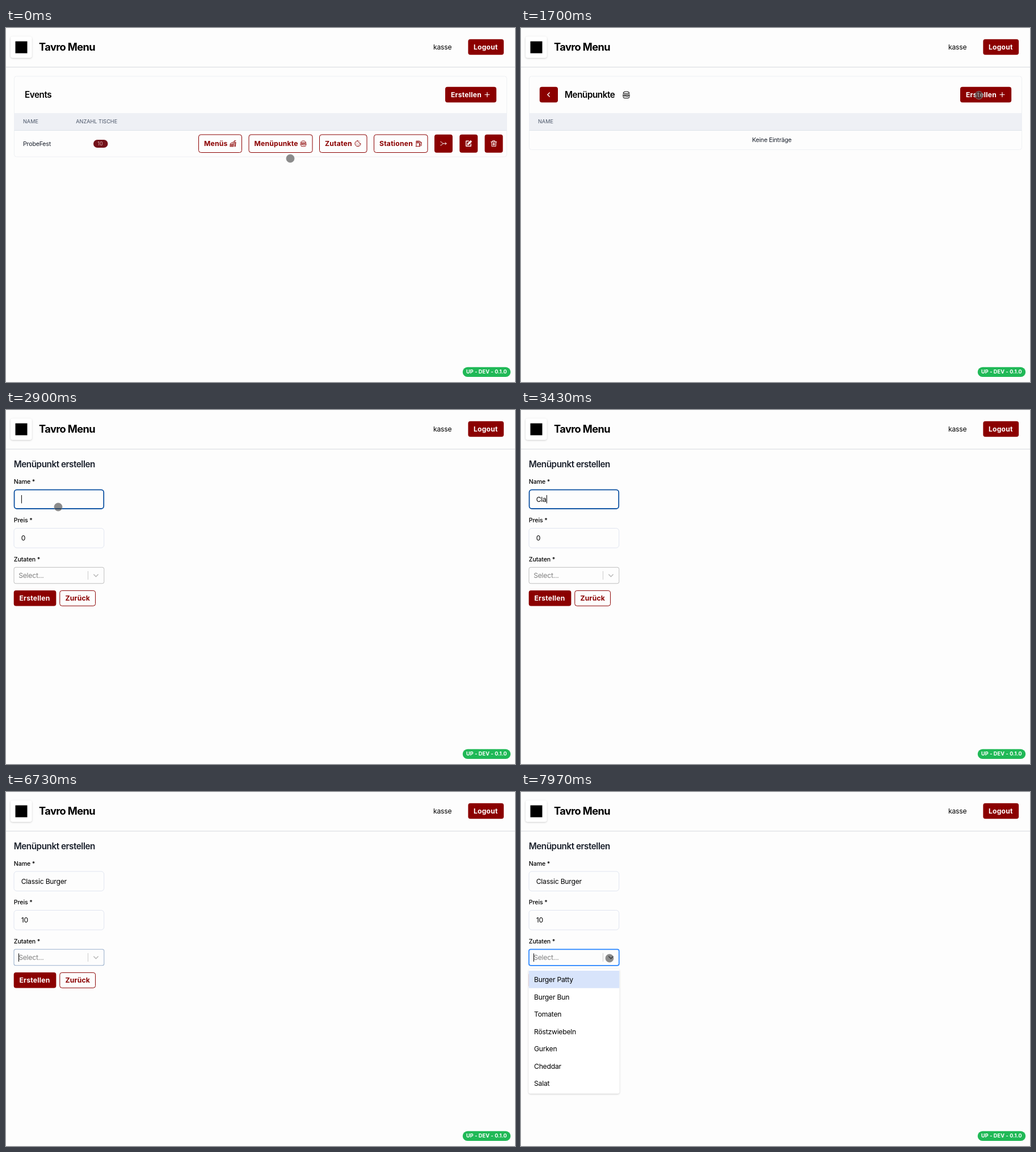
An HTML page that plays this animation: 897x624 px, repeating every 8 s.

```html
<!DOCTYPE html>
<html lang="de">
<head>
<meta charset="utf-8">
<title>Menüpunkt erstellen</title>
<style>
  html, body { margin: 0; width: 100%; height: 100%; overflow: hidden; background: #fdfdfd; }
  svg { display: block; width: 897px; height: 624px; }
  text { font: 400 12.2px Inter, sans-serif; letter-spacing: -.02em; fill: #000; white-space: pre; }
  .title { font-size: 18.3px; font-weight: 700; letter-spacing: -.035em; }
  .head { font-size: 15.25px; font-weight: 600; letter-spacing: -.03em; }
  .btn { font-weight: 700; letter-spacing: .015em; fill: #fff; }
  .line { fill: #8b0000; }
  .label { font-size: 10.675px; font-weight: 500; letter-spacing: -.012em; }
  .cell { font-size: 10.675px; fill: #1a202c; }
  .th { font-size: 9.15px; letter-spacing: 0; fill: #4a5568; }
  .tag { font-size: 9.15px; font-weight: 700; letter-spacing: .015em; fill: #fff; }
  .red { fill: #8b0000; }
  .outline { fill: #fdfdfd; stroke: #8b0000; }
  .card { fill: #fdfdfd; stroke: #eef0f3; }
  .field { fill: #fdfdfd; stroke: #e0e5f0; }
  .ring { fill: none; stroke: #1255a4; stroke-width: 1.8; }
  .caret { fill: #000; }
  .icon { fill: none; stroke: #8b0000; stroke-width: 2; stroke-linecap: round; stroke-linejoin: round; }
  .white { stroke: #fff; }
  .black { stroke: #111; }
</style>
</head>
<body>
<svg viewBox="0 0 897 624">
  <defs>
    <filter id="soft" x="-20%" y="-20%" width="140%" height="140%">
      <feDropShadow dx="0" dy="1" stdDeviation="1.4" flood-opacity=".22"/>
    </filter>
    <symbol id="burger" viewBox="0 0 24 24">
      <path d="M3 8.5C3 .5 21 .5 21 8.5ZM1.5 12.5H22.5M1.5 16H12L14.5 17.5L17 16H22.5M3 19.5C3 23.5 21 23.5 21 19.5"/>
    </symbol>
    <symbol id="meal" viewBox="0 0 24 24">
      <path d="M2 14C2 8 14 8 14 14ZM1 17.5H15M2 21H14V22.5H2ZM11 7H22L20.5 22.5H17.5M16 7L17 2L22 1M15 11H21M18 14V20"/>
    </symbol>
    <symbol id="cookie" viewBox="0 0 24 24">
      <path d="M12 2A10 10 0 1 0 22 12C19 13 17 11 17 8C14 8 12 6 12 2ZM8 9h.1M7 15h.1M12 13h.1M13 18h.1M17 15h.1M18 3h.1"/>
    </symbol>
    <symbol id="pump" viewBox="0 0 24 24">
      <path d="M1 22H16M3 22V3H14V22M6 6H11V10H6ZM14 13H17V18C17 21 21 21 21 18V9L17 4M21 9H18V7"/>
    </symbol>
    <symbol id="merge" viewBox="0 0 24 24">
      <path d="M2 6H4L10 12H22M2 18H4L10 12M18 8L22 12L18 16"/>
    </symbol>
    <symbol id="edit" viewBox="0 0 24 24">
      <path d="M12 3H3V21H20V13M8 16L9 12L19 2L22 5L12 15ZM10 13L20 3" stroke-width="2.8"/>
    </symbol>
    <symbol id="trash" viewBox="0 0 24 24">
      <path d="M2 6H22M8 6V2H16V6M4 6L5 22H19L20 6M9 10V18M12 10V18M15 10V18"/>
    </symbol>
    <g id="create">
      <rect class="red" x="774" y="103.8" width="90.2" height="27.4" rx="4"/>
      <text class="btn" x="784" y="122">Erstellen</text>
      <path class="icon white" d="M844 117.5h8M848 113.5v8" style="stroke-width:1.2"/>
    </g>
    <g id="thead">
      <rect x="14.5" y="150" width="868" height="30" fill="#eef0f5"/>
      <path d="M14.5 180.5H882.5" stroke="#dde4ea"/>
      <text class="th" x="30" y="167.6">NAME</text>
    </g>
  </defs>

  <rect width="897" height="624" fill="#fdfdfd"/>
  <path d="M0 69H897" stroke="#e3e5e8" stroke-width="1.4"/>
  <rect x="8" y="15" width="37.5" height="37.5" rx="4" fill="#fff" filter="url(#soft)"/>
  <rect x="16.5" y="23.5" width="21" height="21"/>
  <text class="title" x="58" y="40.4">Tavro Menu</text>
  <text x="753" y="38.3">kasse</text>
  <rect class="red" x="814.4" y="19.8" width="62.8" height="27.4" rx="4"/>
  <text class="btn" x="824" y="38.3">Logout</text>

  <g id="events">
    <rect class="card" x="14.5" y="85" width="868" height="142" rx="4"/>
    <text class="head" x="33" y="123">Events</text>
    <use href="#create"/>
    <use href="#thead"/>
    <text class="th" x="123.3" y="167.6">ANZAHL TISCHE</text>
    <text class="cell" x="30" y="207.6">ProbeFest</text>
    <rect x="154" y="197" width="25.5" height="14" rx="7" fill="#74121a"/>
    <text class="th" x="161.3" y="207.4" style="fill:#d3a5a5">10</text>
    <g id="actions"></g>
  </g>

  <g id="items">
    <rect class="card" x="14.5" y="85" width="868" height="129.5" rx="4"/>
    <rect class="red" x="32.8" y="103.8" width="32.2" height="27.4" rx="4"/>
    <path class="icon white" d="M50.3 114l-3.5 3.5 3.5 3.5" style="stroke-width:1.3"/>
    <text class="head" x="77" y="123">Menüpunkte</text>
    <use class="icon black" href="#burger" x="178.5" y="110.5" width="14" height="14"/>
    <use href="#create"/>
    <use href="#thead"/>
    <text class="cell" x="442" y="201.3" text-anchor="middle">Keine Einträge</text>
  </g>

  <g id="form">
    <text class="head" x="13.7" y="101" style="fill:#1a202c">Menüpunkt erstellen</text>
    <text class="label" x="13.8" y="129.6">Name *</text>
    <rect class="field" x="14" y="140" width="158.7" height="34.5" rx="5"/>
    <rect class="ring" id="nameRing" x="14.6" y="140.6" width="157.6" height="33.4" rx="4.5"/>
    <text id="name" x="26.7" y="161.7"></text>
    <text class="label" x="13.8" y="198.4">Preis *</text>
    <rect class="field" x="14" y="208.5" width="158.7" height="34.5" rx="5"/>
    <rect class="ring" id="priceRing" x="14.6" y="209.1" width="157.6" height="33.4" rx="4.5"/>
    <rect id="selection" x="26.7" y="217.5" width="8" height="17" fill="#b3d7ff"/>
    <text id="price" x="26.7" y="230.4"></text>
    <text class="label" x="13.8" y="267">Zutaten *</text>
    <rect id="select" x="14" y="277.3" width="158.8" height="28.5" rx="3" fill="#fdfdfd"/>
    <text x="22.2" y="296.2" style="fill:#808080">Select...</text>
    <path d="M144.5 284V299" stroke="#ccc"/>
    <path id="chevron" class="icon" d="M154.8 290l3.7 3.7 3.7-3.7" style="stroke-width:1.6"/>
    <rect class="red" x="13.7" y="318" width="74.7" height="27.6" rx="4"/>
    <text class="btn" x="23.5" y="336.3">Erstellen</text>
    <rect class="outline" x="94.8" y="318.4" width="62.8" height="26.9" rx="3.8"/>
    <text class="btn line" x="104.5" y="336.3">Zurück</text>
    <rect class="caret" id="caret" width="1"/>
    <g id="menu">
      <rect x="13.7" y="312" width="159.6" height="219.5" rx="3" fill="#fff" filter="url(#soft)"/>
      <rect x="13.7" y="315" width="159.6" height="30.7" fill="#d8e4fb"/>
    </g>
  </g>

  <rect x="804.8" y="597.8" width="84.4" height="17.2" rx="8.6" fill="#20b957"/>
  <text class="tag" x="811" y="609.2">UP - DEV - 0.1.0</text>
  <circle id="pointer" r="7" fill="#404040" fill-opacity=".6" stroke="#888" stroke-opacity=".85"/>
</svg>
<script>
const LOOP = 8000;
const $ = id => document.getElementById(id);
const show = (id, on) => $(id).style.visibility = on ? 'visible' : 'hidden';
const clamp = v => Math.max(0, Math.min(1, v));
const mix = (a, b, u) => `rgb(${a.map((v, i) => v + (b[i] - v) * u)})`;

const icon = (name, cx, cls = '', s = 12) =>
  `<use class="icon ${cls}" href="#${name}" x="${cx - s / 2}" y="${203.7 - s / 2}" width="${s}" height="${s}"/>`;

$('actions').innerHTML = [
  ['Menüs', 339.5, 76, 'meal', 400],
  ['Menüpunkte', 428, 112, 'burger', 524],
  ['Zutaten', 552.5, 83.5, 'cookie', 620],
  ['Stationen', 648.5, 94.5, 'pump', 727.5]
].map(([label, x, w, pic, cx]) =>
  `<rect class="outline" x="${x}" y="188" width="${w}" height="31.5" rx="4"/>
   <text class="btn line" x="${x + 9.5}" y="208.2">${label}</text>${icon(pic, cx)}`
).join('') + ['merge', 'edit', 'trash'].map((pic, i) =>
  `<rect class="red" x="${755 + i * 44.3}" y="187.7" width="32" height="32" rx="4"/>` +
  icon(pic, 771 + i * 44.3, 'white')
).join('');

$('menu').innerHTML += ['Burger Patty', 'Burger Bun', 'Tomaten', 'Röstzwiebeln', 'Gurken', 'Cheddar', 'Salat']
  .map((s, i) => `<text x="23" y="${335 + i * 30.5}">${s}</text>`).join('');

const dish = 'Classic Burger';
const keys = [3030, 3230, 3420, 3560, 3700, 3830, 3970, 4070, 4300, 4430, 4570, 4700, 4830, 4970];

// time, x, y
const path = [
  [0, 501, 230], [420, 485, 206], [700, 484, 205], [1650, 807, 118.5], [1900, 807, 118.5],
  [2480, 92.5, 172], [2700, 92, 171], [7170, 92, 171], [7650, 156, 293], [LOOP, 156, 293]
];

function pointerAt(t) {
  const i = path.findIndex(p => p[0] > t);
  const [t0, x0, y0] = path[i - 1], [t1, x1, y1] = path[i];
  const u = (t - t0) / (t1 - t0), e = u * u * (3 - 2 * u);
  return [x0 + (x1 - x0) * e, y0 + (y1 - y0) * e];
}

function placeCaret(x, y, h) {
  const c = $('caret');
  c.setAttribute('x', x);
  c.setAttribute('y', y);
  c.setAttribute('height', h);
}

function render(t) {
  const inForm = t >= 1960;
  const nameOn = t >= 2680 && t < 5060;
  const priceOn = t >= 5060 && t < 6700;
  const selectOn = t >= 6700;
  const open = t >= 7720;

  show('events', t < 700);
  show('items', t >= 700 && !inForm);
  show('form', inForm);
  show('nameRing', nameOn);
  show('priceRing', priceOn);
  show('selection', priceOn && t < 5590);
  show('menu', open);

  $('name').textContent = dish.slice(0, keys.filter(k => k <= t).length);
  $('price').textContent = t < 5590 ? '0' : t < 6000 ? '1' : '10';

  const focus = clamp((t - 6700) / 100);
  $('select').style.stroke = mix([190, 190, 190], [38, 132, 255], focus * focus * (3 - 2 * focus));
  $('select').style.strokeWidth = 1 + .7 * focus ** 2;
  $('chevron').style.stroke = open ? '#333' : t > 6830 ? '#666' : '#bbb';

  const end = id => 26.9 + $(id).getComputedTextLength();
  if (nameOn) placeCaret(end('name'), 150, 14.5);
  else if (priceOn) placeCaret(end('price'), 218.5, 14.5);
  else placeCaret(22, 284.5, 14.5);
  show('caret', nameOn || (priceOn && t >= 5590 && t < 6450) ||
    (selectOn && (t < 7230 || t >= 7720)));

  const [x, y] = pointerAt(t);
  $('pointer').setAttribute('transform', `translate(${x} ${y})`);
  show('pointer', t < 3030 || t >= 7170);
}

const start = performance.now();
function tick() {
  render((performance.now() - start) % LOOP);
  requestAnimationFrame(tick);
}
tick();
</script>
</body>
</html>
```
